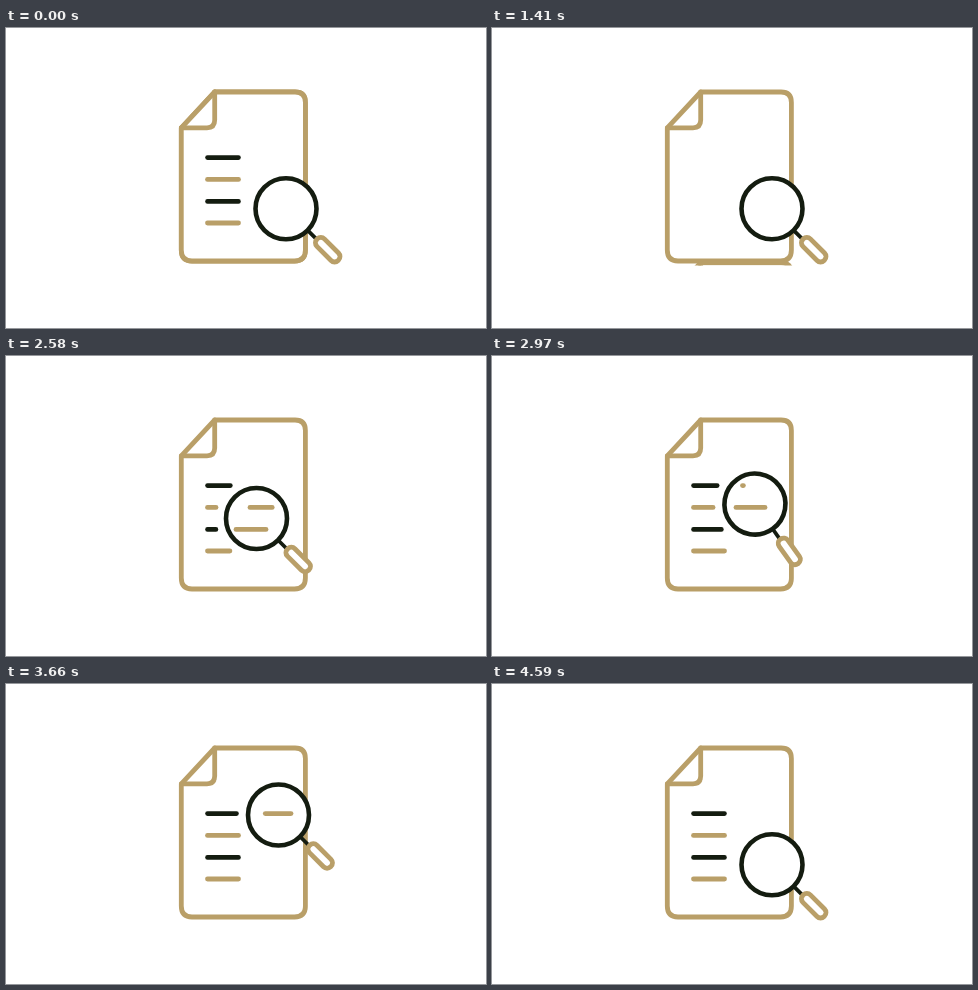
An HTML page that plays this animation: 480 px wide and 300 px high, repeating every 4.62 s.

```html
<!DOCTYPE html>
<html lang="en">
<head>
<meta charset="utf-8">
<title>Document search</title>
<style>
  html, body { margin: 0; width: 100%; height: 100%; overflow: hidden; background: #fff; }
  svg { display: block; width: 100%; height: 100%; fill: none; stroke-linecap: round; stroke-linejoin: round; }
  .gold { stroke: #b99f68; stroke-width: 4.8; }
  .ink { stroke: #141c10; stroke-width: 4.6; }
  .white { fill: #fff; }
</style>
</head>
<body>
<svg viewBox="0 0 480 300">
  <defs>
    <clipPath id="window"><rect x="172" y="60" width="131" height="177.5"/></clipPath>
    <g id="page">
      <path class="white" d="M175.3 99.8 L208.7 64 H289 Q299.4 64 299.4 74.5 V222 Q299.4 233 288.5 233 H186 Q175.3 233 175.3 222 Z"/>
      <path d="M208.7 64 V92 Q208.7 99.8 201 99.8 H175.3"/>
    </g>
  </defs>
  <use href="#page" class="gold"/>
  <g clip-path="url(#window)"><use href="#page" id="sheet" class="gold"/></g>
  <g id="text"></g>
  <g id="lens">
    <path class="ink" stroke-linecap="butt" style="stroke-width:3.8" d="M21 21 L31 31"/>
    <circle class="ink white" r="30.5"/>
    <rect class="gold white" x="-15" y="-5.3" width="30" height="10.6" rx="5" transform="translate(41.7 41) rotate(45)"/>
  </g>
  <g id="found"></g>
</svg>
<script>
  const LOOP = 4620, LEFT = 201.5, RIGHT = 232.5, GAP = 42;
  const $ = id => document.getElementById(id);
  const sine = p => (1 - Math.cos(Math.PI * p)) / 2;
  const linear = p => p;

  // keys: [time, value] pairs, eased between neighbours
  function tween(t, keys, ease = sine) {
    if (t <= keys[0][0]) return keys[0][1];
    for (let i = 1; i < keys.length; i++) {
      const [a, from] = keys[i - 1], [b, to] = keys[i];
      if (t < b) return from + (to - from) * ease((t - a) / (b - a));
    }
    return keys[keys.length - 1][1];
  }

  function addLine(parent, y, cls) {
    const el = document.createElementNS('http://www.w3.org/2000/svg', 'path');
    el.setAttribute('class', cls);
    $(parent).append(el);
    return { el, y };
  }

  function setLine({ el, y }, x1, x2, opacity = 1) {
    el.setAttribute('d', `M${x1} ${y} H${x2}`);
    el.style.opacity = x2 - x1 > 0.05 ? opacity : 0;
  }

  const rows = [129.6, 151.4, 173.4, 195].map((y, i) => addLine('text', y, i % 2 ? 'gold' : 'ink'));

  const hits = [
    { y: 173.4, start: [[0, 230]], end: [[2040, 230], [2450, 260], [2820, 260], [2980, 238]], fade: [[2820, 1], [2985, 0]] },
    { y: 151.4, start: [[0, 244]], end: [[2330, 244], [2700, 273]], fade: [[3340, 1], [3500, 0]] },
    { y: 129.6, start: [[3560, 250.5], [3860, 285]], end: [[2930, 250.5], [3330, 285]], fade: [[3800, 1], [3880, 0]] }
  ].map(h => ({ ...h, line: addLine('found', h.y, 'gold') }));

  const pathX = [[1700, 280], [2190, 250.5], [2800, 250.5], [2980, 263], [3320, 260.5], [3620, 272.5], [3670, 272.5], [4200, 280]];
  const pathY = [[1700, 180.7], [2190, 162.5], [2800, 162.5], [2980, 148], [3320, 140], [3620, 131], [3670, 131], [4200, 180.7]];
  const tilt = [[2800, 0], [2970, 9.5], [3300, 0]];

  function draw(t) {
    const x = tween(t, pathX), y = tween(t, pathY);
    $('lens').setAttribute('transform', `translate(${x} ${y}) rotate(${tween(t, tilt)})`);
    $('sheet').setAttribute('transform', `translate(0 ${tween(t, [[980, 0], [1475, 178]])})`);

    const fresh = t > 1600;
    const opacity = fresh ? 1 : tween(t, [[0, 1], [885, 0]], p => p * p);
    const tip = fresh ? tween(t, [[1720, LEFT], [2220, RIGHT]], linear) : RIGHT;
    for (const row of rows) {
      const dy = row.y - y;
      const edge = Math.abs(dy) < GAP ? x - Math.sqrt(GAP * GAP - dy * dy) : RIGHT;
      setLine(row, LEFT, Math.min(tip, edge), opacity);
    }
    for (const h of hits) setLine(h.line, tween(t, h.start), tween(t, h.end), tween(t, h.fade));
  }

  function tick() {
    draw(performance.now() % LOOP);
    requestAnimationFrame(tick);
  }
  tick();
</script>
</body>
</html>
```
